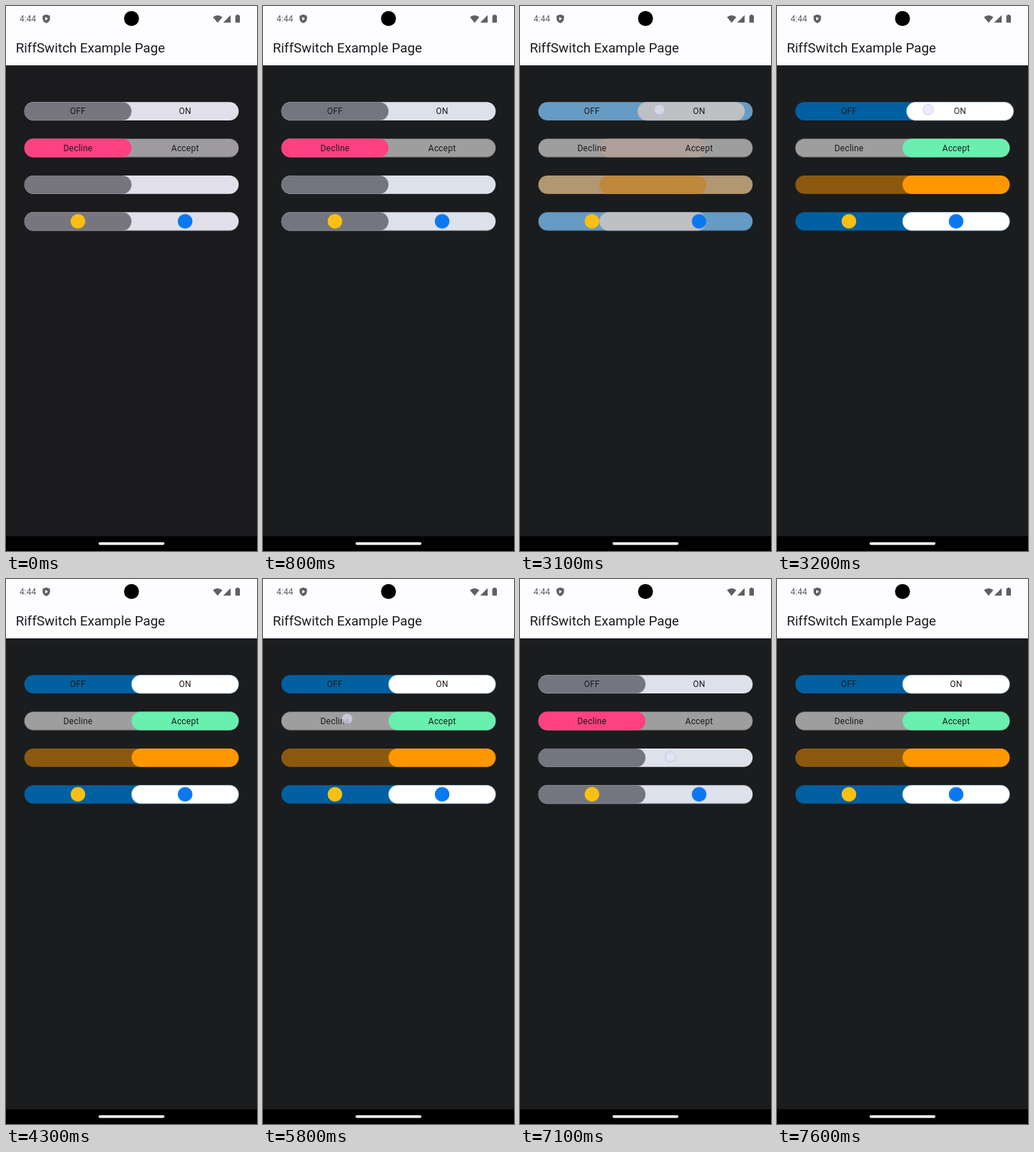
An HTML page that plays this animation: 352x762 px, repeating every 8000 ms.

```html
<!DOCTYPE html>
<html lang="en">
<head>
<meta charset="utf-8">
<title>Switch demo</title>
<style>
  html, body { margin: 0; width: 100%; height: 100%; overflow: hidden; background: #1a1c1e; }
  svg { display: block; width: 100%; height: 100%; font-family: Roboto, sans-serif; }

  .backdrop { animation: backdrop 8s linear infinite; }
  .row {
    --track-start: #e1e0ea; --track-off: #dde1ea; --track-on: #0060a1;
    --thumb-start: #77757d; --thumb-off: #73767f; --thumb-on: #fff;
  }
  .choice {
    --track-start: #9e9b9f; --track-off: #9e9e9e; --track-on: #9e9e9e;
    --thumb-start: #ff4081; --thumb-off: #ff4081; --thumb-on: #69f0ae;
  }
  .orange { --track-on: #8b590e; --thumb-on: #ff9800; }

  .track, .thumb { x: 25.7px; y: 0; height: 25.67px; rx: 12.83px; }
  .track { width: 300.6px; animation: track 8s linear infinite; }
  .thumb { width: 150.3px; animation: thumb 8s linear infinite, slide 8s ease-in-out infinite; }
  .dragged .thumb { animation-name: thumb, drag; }
  .dragged .on { animation: pull 8s ease-in-out infinite; }
  .row text { font-size: 12px; letter-spacing: .21px; text-anchor: middle; fill: #1a1c1e; }
  .touch { fill: rgba(228, 226, 248, .65); stroke: rgba(165, 172, 215, .5); animation: touch 8s ease-in-out infinite; }

  @keyframes backdrop {
    0%, 7.5% { fill: #1b1b1e; }
    10%, 100% { fill: #1a1c1e; }
  }
  @keyframes track {
    0%, 7.5% { fill: var(--track-start); }
    10%, 37.75%, 76.125%, 93% { fill: var(--track-off); }
    39.625%, 74.25%, 94.875%, 100% { fill: var(--track-on); }
  }
  @keyframes thumb {
    0%, 7.5% { fill: var(--thumb-start); }
    10%, 37.75%, 76.125%, 93% { fill: var(--thumb-off); }
    39.625%, 74.25%, 94.875%, 100% { fill: var(--thumb-on); }
  }
  @keyframes slide {
    0%, 37.75%, 76.125%, 93% { transform: translateX(0); }
    39.625%, 74.25%, 94.875%, 100% { transform: translateX(150.3px); }
  }
  /* The dragged thumb overshoots the end of its track, then relaxes on release. */
  @keyframes drag {
    0%, 36.25%, 76.125%, 93% { transform: translateX(0); }
    39.5%, 40% { transform: translateX(155.8px); }
    42.5%, 51.25% { transform: translateX(153.3px); }
    53.75%, 74.25%, 94.875%, 100% { transform: translateX(150.3px); }
  }
  @keyframes pull {
    0%, 39%, 53.75%, 100% { transform: translateX(0); }
    39.5%, 40% { transform: translateX(5.5px); }
    42.5%, 51.25% { transform: translateX(3px); }
  }
  @keyframes touch {
    0%, 36.24% { opacity: 0; transform: translate(56px, 145px); }
    36.25% { opacity: 1; transform: translate(56px, 145px); }
    39.5%, 51.24% { opacity: 1; transform: translate(212px, 145px); }
    51.25%, 71.24% { opacity: 0; transform: translate(118px, 195.5px); }
    71.25%, 74.24% { opacity: 1; transform: translate(118px, 195.5px); }
    74.25%, 88.74% { opacity: 0; transform: translate(211px, 248.5px); }
    88.75%, 92.99% { opacity: 1; transform: translate(211px, 248.5px); }
    93%, 100% { opacity: 0; transform: translate(211px, 248.5px); }
  }
</style>
</head>
<body>
<svg viewBox="0 0 352 762" preserveAspectRatio="none">
  <rect class="backdrop" width="352" height="762"/>

  <rect width="352" height="83" fill="#fdfcff"/>
  <g fill="#606063">
    <text x="19" y="22.2" font-size="12">4:44</text>
    <path d="M56.5 11.8l5.2 2v3.8c0 3-2.2 5.5-5.2 6.5c-3-1-5.2-3.5-5.2-6.5v-3.8z"/>
    <path d="M55 15.2v5l4-2.5z" fill="#fdfcff"/>
    <path d="M290.2 15.6Q296.8 10.6 303.4 15.6L296.8 23.4z"/>
    <path d="M315 12.8v10.4h-10.4z"/>
    <path d="M323.4 12h2.8v1.2h1.8v10h-6.4v-10h1.8z"/>
  </g>
  <circle cx="176" cy="17.5" r="10.5"/>
  <text x="13.7" y="65.4" font-size="18.82" fill="#1a1c1e">RiffSwitch Example Page</text>

  <g class="row dragged" transform="translate(0 134.3)">
    <rect class="track"/><rect class="thumb"/>
    <text x="100.9" y="17.2">OFF</text><text class="on" x="251.2" y="17.2">ON</text>
  </g>
  <g class="row choice" transform="translate(0 185.6)">
    <rect class="track"/><rect class="thumb"/>
    <text x="100.9" y="17.2">Decline</text><text x="251.2" y="17.2">Accept</text>
  </g>
  <g class="row orange" transform="translate(0 237)">
    <rect class="track"/><rect class="thumb"/>
  </g>
  <g class="row" transform="translate(0 288.3)">
    <rect class="track"/><rect class="thumb"/>
    <circle cx="100.9" cy="12.8" r="10.3" fill="#f9c013"/>
    <circle cx="251.2" cy="12.8" r="10.3" fill="#0b78f0"/>
  </g>

  <circle class="touch" r="7.3"/>

  <rect y="741.3" width="352" height="20.7"/>
  <rect x="129.8" y="749.8" width="92.4" height="3.6" rx="1.8" fill="#fff"/>
</svg>
</body>
</html>
```
